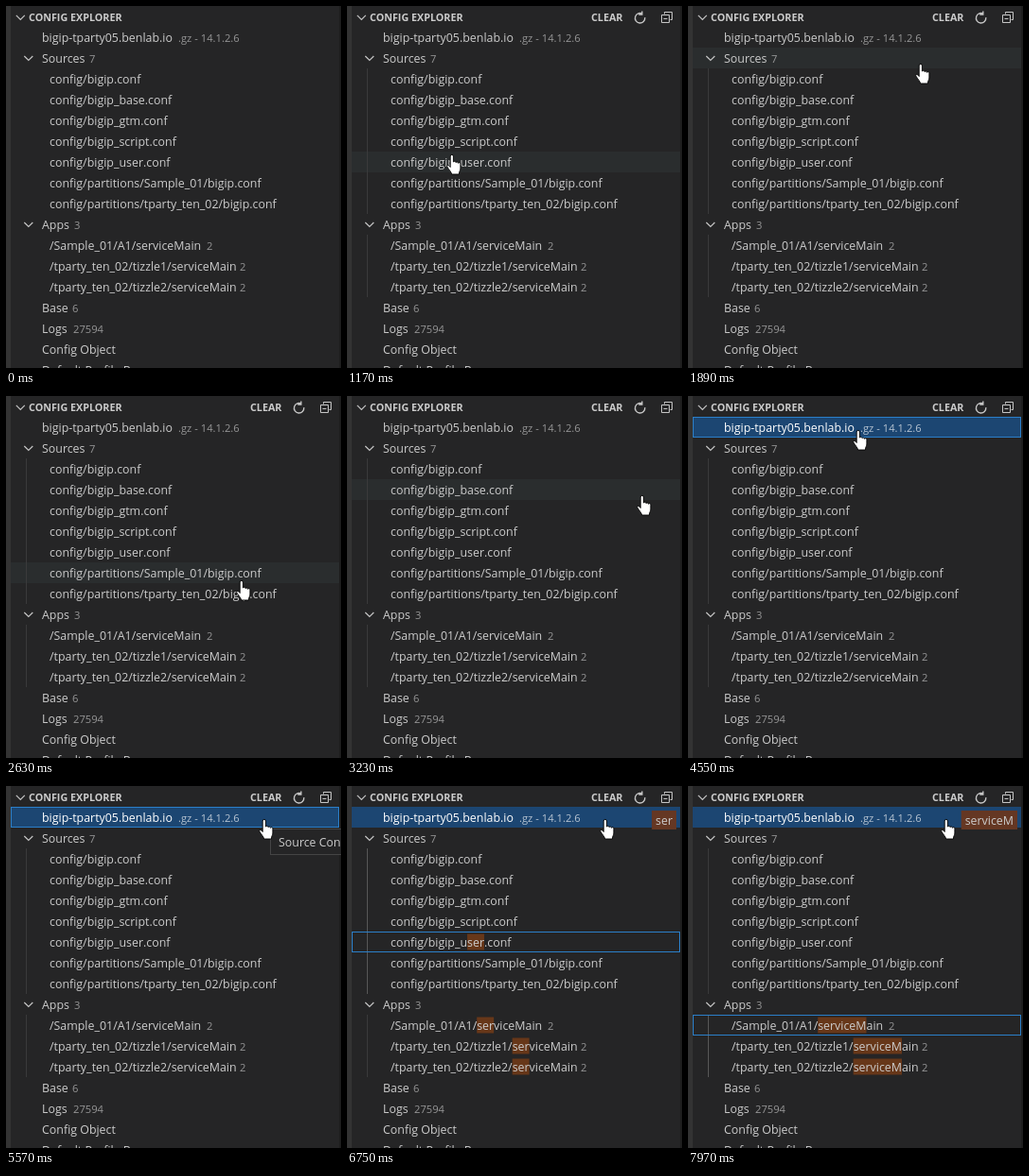
These frames come from a looping animation (354 px wide and 383 px high, 8000 ms). An HTML page:

```html
<!DOCTYPE html>
<html lang="en">
<head>
<meta charset="utf-8">
<title>Config explorer</title>
<style>
html, body { margin: 0; width: 100%; height: 100%; overflow: hidden; background: #252526; }
svg { display: block; width: 354px; height: 383px; }
text { font: 12.4px "Open Sans", "Noto Sans", sans-serif; fill: #ccc; white-space: pre; }
.note { font-size: 11.2px; opacity: .68; }
.head { font-size: 10.75px; font-weight: 700; }
.on text { fill: #fff; }
.line { fill: none; stroke: #c5c5c5; }
.mark { fill: #673719; }
</style>
</head>
<body>
<svg id="stage" viewBox="0 0 354 383"></svg>
<script>
const LOOP = 8000, ROW = 22, LEFT = 5, RIGHT = 352;
const stage = document.getElementById('stage');

// label, x, note, note x
const rows = [
  ['bigip-tparty05.benlab.io', 38, '.gz - 14.1.2.6', 182],
  ['Sources', 38, '7', 88],
  ['config/bigip.conf', 46],
  ['config/bigip_base.conf', 46],
  ['config/bigip_gtm.conf', 46],
  ['config/bigip_script.conf', 46],
  ['config/bigip_user.conf', 46],
  ['config/partitions/Sample_01/bigip.conf', 46],
  ['config/partitions/tparty_ten_02/bigip.conf', 46],
  ['Apps', 38, '3', 72],
  ['/Sample_01/A1/serviceMain', 46, '2', 212],
  ['/tparty_ten_02/tizzle1/serviceMain', 46, '2', 247],
  ['/tparty_ten_02/tizzle2/serviceMain', 46, '2', 247],
  ['Base', 38, '6', 70],
  ['Logs', 38, '27594', 71],
  ['Config Object', 38],
  ['Default Profile Base', 38]
];

// time, x, y of the pointer
const moves = [
  [750, 0, 145], [900, 32, 150], [1050, 72, 155], [1170, 105, 157],
  [1290, 140, 145], [1440, 180, 118], [1590, 212, 88], [1740, 234, 66],
  [1890, 240, 61], [2040, 229, 90], [2190, 231, 132], [2340, 235, 180],
  [2480, 238, 213], [2630, 243, 195], [2780, 252, 186], [2930, 258, 180],
  [3080, 288, 145], [3230, 306, 105], [3380, 275, 70], [3530, 210, 48],
  [3680, 158, 37], [3830, 180, 33], [3980, 174, 36], [4990, 205, 39],
  [5140, 243, 38], [5290, 267, 35]
];

const keys = [
  [6450, 's'], [6600, 'se'], [6750, 'ser'], [7060, 'serv'], [7210, 'servi'],
  [7360, 'servic'], [7510, 'service'], [7970, 'serviceM']
];

const ENTER = 750, SELECT = 4130, TIP = 5570, TYPE = 6450;

function el(tag, attrs, parent = stage, text) {
  const node = document.createElementNS('http://www.w3.org/2000/svg', tag);
  set(node, attrs);
  if (text) node.textContent = text;
  return parent.appendChild(node);
}
function set(node, attrs) {
  for (const k in attrs) node.setAttribute(k, attrs[k]);
}
const show = (node, on) => set(node, { visibility: on ? 'visible' : 'hidden' });
const rowY = i => ROW * (i + 1);
const at = (list, t) => list.filter(step => step[0] <= t).pop();
const chevron = (x, y) =>
  el('path', { class: 'line', d: `M${x} ${y}l4.5 4.5l4.5 -4.5`, 'stroke-width': 1.2 });

el('rect', { width: LEFT, height: 383, fill: '#333' });
el('rect', { x: RIGHT, width: 2, height: 383, fill: '#1e1e1e' });
const hover = el('rect', { x: LEFT, width: RIGHT - LEFT, height: ROW, fill: '#2a2d2e' });
const chosen = el('rect', { x: LEFT, y: rowY(0), width: RIGHT - LEFT, height: ROW, fill: '#1c4672' });

const guides = [[2, 8], [10, 12]].map(([from, to]) => ({
  from, to, node: el('path', { d: `M21.5 ${rowY(from)}V${rowY(to + 1)}` })
}));
chevron(10.8, 9.8);
chevron(19.3, rowY(1) + 9);
chevron(19.3, rowY(9) + 9);
el('text', { class: 'head', x: 24, y: 16 }, stage, 'CONFIG EXPLORER');

const tools = el('g', {});
el('text', { class: 'head', x: 258, y: 16 }, tools, 'CLEAR');
el('path', { class: 'line', d: 'M312.3 8.3A5.2 5.2 0 1 0 314.8 12.2M311.8 5.5V9H308.3', 'stroke-width': 1.4 }, tools);
el('path', { class: 'line', d: 'M335.5 8.5V6.5H343.5V14.5H341.5M332.5 9.5H340.5V17.5H332.5ZM334.5 13.5H338.5' }, tools);

const items = rows.map(([label, x, note, noteX], i) => {
  const g = el('g', {});
  const mark = el('rect', { class: 'mark', y: rowY(i) + 2.5, height: 17 }, g);
  const text = el('text', { x, y: rowY(i) + 16 }, g, label);
  if (note) el('text', { class: 'note', x: noteX, y: rowY(i) + 16 }, g, note);
  return { g, mark, text, label };
});

const focus = el('rect', { x: LEFT + .5, width: RIGHT - LEFT - 1, height: ROW - 1, fill: 'none', stroke: '#2b7fc9' });

const box = el('g', {});
const boxBack = el('rect', { y: 26, height: 20, fill: '#653723' }, box);
const boxText = el('text', { x: 344, y: 40.5, 'text-anchor': 'end' }, box);

const tip = el('g', {});
el('rect', { x: 279.5, y: 45.5, width: 90, height: 27, fill: '#252526', stroke: '#454545' }, tip);
el('text', { x: 288, y: 64 }, tip, 'Source Config');

const hand = el('path', {
  d: 'M4.2 13.5V2a1.6 1.6 0 0 1 3.2 0V8a1.4 1.4 0 0 1 2.6 .6a1.4 1.4 0 0 1 2.5 .7a1.3 1.3 0 0 1 2.4 .9V15' +
     'c0 2-1.5 3-1.5 6H5.6C5.6 19 2.8 16.5 1 13.2C0 11.3 2 10.3 4.2 13.5Z',
  fill: '#fff', stroke: '#000', 'stroke-width': .9
});

function find(label, query) {
  if (!query) return -1;
  return label.toLowerCase().startsWith(query) ? 0 : label.indexOf(query);
}

// Highlights every match and returns the first matching row.
function highlight(query) {
  let first = -1;
  items.forEach(({ mark, text, label }, i) => {
    const pos = find(label, query);
    show(mark, pos >= 0);
    if (pos < 0) return;
    if (first < 0) first = i;
    set(mark, {
      x: text.getStartPositionOfChar(pos).x,
      width: text.getSubStringLength(pos, query.length)
    });
  });
  return Math.max(first, 0);
}

function draw(t) {
  const inside = t >= ENTER, selected = t >= SELECT;
  const move = at(moves, t), key = at(keys, t);
  const query = key ? key[1] : '';

  show(tools, inside);
  show(hand, inside);
  show(hover, inside && !selected);
  if (move) {
    const [, x, y] = move;
    set(hand, { transform: `translate(${x} ${y})` });
    set(hover, { y: Math.floor((y + 1) / ROW) * ROW });
  }

  show(chosen, selected);
  set(items[0].g, { class: selected ? 'on' : '' });
  show(tip, t >= TIP && t < TYPE);

  const current = highlight(query);
  show(focus, selected);
  set(focus, { y: rowY(current) + .5 });
  guides.forEach(({ from, to, node }) => {
    show(node, inside);
    set(node, { stroke: current >= from - 1 && current <= to ? '#585858' : '#3a3a3b' });
  });

  show(box, query);
  boxText.textContent = query;
  if (query) {
    const w = boxText.getComputedTextLength();
    set(boxBack, { x: 340 - w, width: w + 8 });
  }
}

let last = '';
function tick() {
  const t = performance.now() % LOOP;
  const state = [at(moves, t), at(keys, t), t >= SELECT, t >= TIP].join();
  if (state !== last) draw(t);
  last = state;
  requestAnimationFrame(tick);
}
tick();
</script>
</body>
</html>
```
